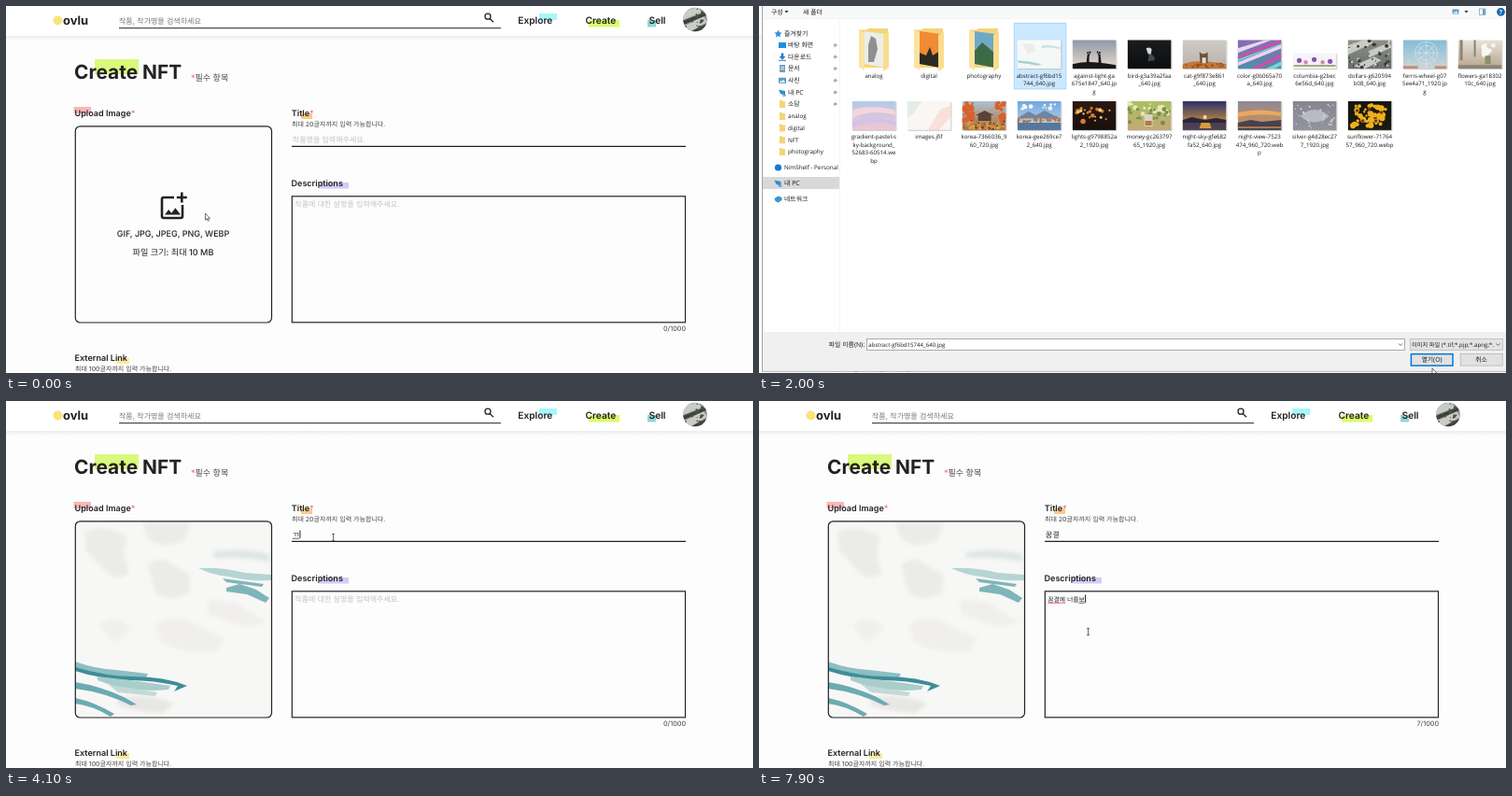
An HTML page that plays this animation: 800x393 px, repeating every 8 s.

```html
<!DOCTYPE html>
<html lang="ko">
<head>
<meta charset="utf-8">
<title>Create NFT</title>
<style>
html, body { margin: 0; width: 100%; height: 100%; overflow: hidden; background: #fdfdfe; }
svg { display: block; width: 100%; height: 100%; }
text { white-space: pre; text-rendering: geometricPrecision; }
#page { font-family: Inter, "Noto Sans CJK KR", "Noto Sans CJK", sans-serif; fill: #222; }
#dialog { font-family: "Open Sans", "Noto Sans CJK KR", "Noto Sans CJK", sans-serif; font-size: 6.9px; fill: #1a1a1a; }
.nav { font-size: 10.2px; font-weight: 600; }
.head { font-size: 9.05px; font-weight: 600; }
.hint { font-size: 7px; fill: #444; }
.field { font-size: 8px; }
.ghost { font-size: 8px; fill: #c2c2c4; }
.req { fill: #f2667a; font-weight: 400; }
.line { fill: none; stroke: #222; }
</style>
</head>
<body>
<svg viewBox="0 0 800 393" xmlns="http://www.w3.org/2000/svg">
<defs>
  <linearGradient id="shade" x2="0" y2="1">
    <stop stop-color="#000" stop-opacity=".07"/><stop offset="1" stop-color="#000" stop-opacity="0"/>
  </linearGradient>
  <clipPath id="card"><rect x="74.3" y="128.8" width="210.2" height="210.2" rx="5"/></clipPath>
  <clipPath id="disc"><circle cx="738" cy="14.5" r="12.8"/></clipPath>
  <clipPath id="combo"><rect x="698" y="357" width="90" height="12"/></clipPath>
  <filter id="soft"><feGaussianBlur stdDeviation="2.2"/></filter>
</defs>

<g id="page">
  <rect width="800" height="393" fill="#fdfdfe"/>
  <rect width="800" height="32" fill="#fff"/>
  <rect y="32" width="800" height="5" fill="url(#shade)"/>

  <circle cx="55.5" cy="15.5" r="5" fill="#fae27c"/>
  <text x="61" y="20" font-size="13" font-weight="700">ovlu</text>
  <text class="field" x="121" y="18.8" fill="#777">작품, 작가명을 검색하세요</text>
  <path class="line" d="M121 23.700H530"/>
  <path class="line" stroke-width="1.300" d="M519 11.200a3 3 0 1 0-6 0a3 3 0 1 0 6 0M518.200 13.400l3.800 3.800"/>
  <path fill="#a5f7fa" d="M571 8h19v7h-19z"/>
  <path fill="#dcfb6c" d="M624 15h33v7.500h-33z"/>
  <path fill="#93d8d2" d="M687 15h9v7.500h-9z"/>
  <g class="nav">
    <text x="548.300" y="19">Explore</text>
    <text x="620.500" y="19">Create</text>
    <text x="688.500" y="19">Sell</text>
  </g>
  <g clip-path="url(#disc)" id="face">
    <rect x="724" y="1" width="28" height="28" fill="#8d918b"/>
    <path fill="#c9ccc4" d="M724 6l17-5 4 6-20 8zM727 21l20-10 4 6-19 11z"/>
    <path fill="#3d423d" d="M724 16l24-9 2 3-24 10zM732 28l18-9v6l-8 4z"/>
  </g>

  <path fill="#d9f97c" d="M95 57h47v16h-47z"/>
  <text x="73" y="77.600" font-size="20.900" font-weight="700">Create NFT</text>
  <text x="198" y="80.400" font-size="9" fill="#444"><tspan class="req">*</tspan>필수 항목</text>

  <path fill="#f8b7b8" d="M72.500 108h18.500v7h-18.500z"/>
  <path fill="#fbc98a" d="M316 115h12v6h-12z"/>
  <path fill="#d3cbf5" d="M336 189h31v6.500h-31z"/>
  <path fill="#fbeaa0" d="M118 377h14v6h-14z"/>
  <g class="head">
    <text x="73.500" y="118.200">Upload Image<tspan class="req">*</tspan></text>
    <text x="305.800" y="118.200">Title<tspan class="req">*</tspan></text>
    <text x="305.500" y="192.800">Descriptions</text>
    <text x="73.500" y="380.200">External Link</text>
  </g>
  <text class="hint" x="306" y="129.200">최대 20글자까지 입력 가능합니다.</text>
  <text class="hint" x="74" y="391.200">최대 100글자까지 입력 가능합니다.</text>

  <g id="empty">
    <path class="line" stroke-width="2.600" d="M180 205H169q-2 0-2 2V225q0 2 2 2H187q2 0 2-2V213M188.300 199.500V210.500M182.800 205H193.800"/>
    <path d="M170 223.500l4.200-5.400 3 3.600 4.200-5.400 5.600 7.200z"/>
    <g text-anchor="middle" font-weight="500">
      <text x="179" y="247.200" font-size="9">GIF, JPG, JPEG, PNG, WEBP</text>
      <text x="179" y="267" font-size="9.150">파일 크기: 최대 10 MB</text>
    </g>
  </g>
  <g id="art" clip-path="url(#card)">
    <rect x="74" y="128" width="211" height="212" fill="#f7f7f6"/>
    <g filter="url(#soft)">
      <path fill="#ebebe8" d="M84 140q24-10 46 6l-4 18 6 20q-14 10-24 0l-22-24zM146 130h52l-6 18q-22 12-40 0zM152 176q14-14 30 2l16 8-2 20q-20 10-36 0z"/>
      <path fill="#f0efec" d="M160 240q20-14 44 0l30 14-8 14q-34 4-60-10zM216 212l30 4 34 22-24 4-40-14zM100 240q18-14 34 4l-18 16z"/>
      <path fill="#dde6e4" d="M222 162q30-6 60 2v8q-32-6-60-4z"/>
      <path fill="#e8e6e2" d="M120 318q30-6 60 6l-12 10q-30-2-48-8z"/>
    </g>
    <path fill="#b5d5d3" d="M206 179q26-1 50 5l28 2v6q-26 1-46-4-18-2-32-9z"/>
    <path fill="#7eb5b8" d="M236 200l14-4 18 6 14 9-4 5-20-9-22-3zM232 190l44 6-2 3-38-5z"/>
    <path fill="#8bbfc2" d="M74 279q22 8 44 9l34 4-2 4-36-1q-22-2-40-8z"/>
    <path fill="#3f8d98" d="M74 285q34 10 62 10 34 0 58 10l-14 6 4-6q-26-6-52-6-34-2-58-10z"/>
    <path fill="#a9cdca" d="M98 295q38 4 78 10l-2 4q-44 4-76-10z"/>
    <path fill="#6aabb1" d="M74 301q26 4 52 16l14 8-6 1q-28-14-60-18zM74 318q20 4 42 17l-4 3q-20-12-38-14z"/>
    <path fill="#c1dad7" d="M110 304l52 8-2 4-40-4z"/>
  </g>
  <rect class="line" x="74.300" y="128.800" width="210.200" height="210.200" rx="5" stroke-width="1.200"/>

  <path class="line" stroke-width="1.200" d="M306 150.300H728"/>
  <rect class="line" x="306.300" y="203.800" width="421.200" height="135" stroke-width="1.200"/>
  <text id="count" x="728" y="348.300" font-size="7.300" text-anchor="end" style="fill:#444"></text>
</g>

<g id="dialog"></g>
<g id="arrow"><path d="M0 0V7.200L1.700 5.700 2.800 8.200 3.900 7.700 2.800 5.300H5Z" fill="#fff" stroke="#333" stroke-width=".7"/></g>
<g id="beam"><path d="M-1.500-3.600H1.500M-1.500 3.600H1.500M0-3.600V3.600" fill="none" stroke="#444" stroke-width=".8"/></g>
</svg>

<script>
const $ = id => document.getElementById(id);

function el(tag, attrs, parent, text) {
  const node = document.createElementNS("http://www.w3.org/2000/svg", tag);
  for (const k in attrs) node.setAttribute(k, attrs[k]);
  if (text !== undefined) node.textContent = text;
  return parent.appendChild(node);
}
const box = (p, x, y, width, height, fill, more) => el("rect", { x, y, width, height, fill, ...more }, p);
const path = (p, d, fill, more) => el("path", { d, fill, ...more }, p);
const word = (p, x, y, text, more) => el("text", { x, y, ...more }, p, text);
const show = (node, on) => node.style.display = on ? "" : "none";
const dot = (x, y, r) => `M${x - r} ${y}a${r} ${r} 0 1 0 ${2 * r} 0a${r} ${r} 0 1 0 ${-2 * r} 0`;
const dots = (r, ...xy) => xy.map(([x, y]) => dot(x, y, r)).join("");

let seed = 7;
const rand = () => (seed = seed * 16807 % 2147483647) / 2147483647;
// n random dots inside the given area
const specks = (n, r, x, y, w, h) =>
  Array.from({ length: n }, () => dot(x + w * rand(), y + h * rand(), r * (.5 + rand()))).join("");

// ---- file dialog ----
const dlg = $("dialog");
box(dlg, 3.5, -2, 800, 393.2, "#fff", { stroke: "#9a9a9a", "stroke-width": .9 });
box(dlg, 4, 0, 796, 13, "#f8f9fa");
path(dlg, "M4 13.500H800M86.500 14V349", "none", { stroke: "#f1f1f3", "stroke-width": .8 });
box(dlg, 4, 349, 796, 41.8, "#f0f0f0");
box(dlg, 4, 183, 82, 13, "#d9d9d9");
box(dlg, 115.5, 356.5, 576, 12, "#fff");
box(dlg, 697.5, 356.5, 99, 12, "#e3e3e3", { stroke: "#b4b4b4", "stroke-width": .7 });
word(dlg, 699, 365.2, "이미지 파일 (*.tif;*.pjp;*.apng;*.", { "font-size": 6.2, "clip-path": "url(#combo)" });
path(dlg, "M789.500 361.500l2 2 2-2", "none", { stroke: "#444", "stroke-width": .8 });
box(dlg, 771.5, 3, 6.5, 6.5, "#fff", { stroke: "#7f97aa", "stroke-width": .7 });
box(dlg, 775, 3.3, 2.7, 5.9, "#5b9fce");
path(dlg, dot(794.5, 6.3, 4.4), "#1668b3");
word(dlg, 794.5, 8.8, "?", { fill: "#fff", "font-weight": 700, "text-anchor": "middle" });

const BLUE = "#2b8fdb";
const icons = {
  star: ["M0-4l1.200 2.700 3 .3-2.300 2 .7 3L0 2.500-2.600 4l.7-3-2.300-2 3-.3z", BLUE],
  desk: ["M-4-3H4V3H-4z", "#1e90e0"],
  down: ["M-1.300-4H1.300V-.5H3.500L0 3-3.500-.5H-1.300zM-4 3.200H4v1H-4z", "#2579c4"],
  doc: ["M-3-4H3V4H-3zM-2-2V-1.300H2V-2zM-2 0V.7H2V0z", "#7d9db8"],
  pic: ["M-4-3H4V3H-4zM-3 2H3L1-1-.5 1-1.500 0z", "#5b9cc6"],
  pc: ["M-4-3L3-1.500V3L-2 1.500zM0 3h4v1h-4z", "#2f8fcf"],
  dir: ["M-3-4H-.5L.3-3H3V4H-3z", "#f6d374"],
  net: ["M-4-1L0-3.500 4-2V1L0 3.500-3 2z", "#3a94cf"],
  ball: [dot(0, 0, 3.6), "#1478d0"]
};
const tree = [
  ["star", 29.5, "즐겨찾기", 0], ["desk", 42, "바탕 화면", 2], ["down", 54.5, "다운로드", 2],
  ["doc", 67, "문서", 2], ["pic", 79.7, "사진", 2], ["pc", 92.5, "내 PC", 2], ["dir", 105, "소담", 2],
  ["dir", 118, "analog", 1], ["dir", 130.6, "digital", 1], ["dir", 143.2, "NFT", 1], ["dir", 156, "photography", 1],
  ["ball", 173, "NimShelf - Personal", 0], ["pc", 189.5, "내 PC", 0], ["net", 207, "네트워크", 0]
];
const late = el("g", {}, dlg);
for (const [icon, y, name, kind] of tree) {
  const [d, fill] = icons[icon];
  path(icon === "ball" ? late : dlg, d, fill, { transform: `translate(${kind ? 25 : 20.5} ${y})`, "fill-rule": "evenodd" });
  word(dlg, kind ? 31 : 27, y + 2.4, name, { "font-size": /[가-힣]/.test(name) ? 6.9 : 6.3 });
  if (kind === 2) path(dlg, `M81.500 ${y - 2}l2.500 2.300-2 .5-.5 1-1.800-1.800 1-.5zM79.500 ${y + 2.3}l1.600-1.600`, "#a3a6aa", { stroke: "#a3a6aa", "stroke-width": .4 });
}

const tile = box(dlg, 273.2, 18.3, 55.6, 70.6, "none", { "stroke-width": .8 });

// Pictures: caption, sky, ground, then [fill, path] shapes in a 47 x 31 box; "~" marks a stroke.
const BLACK = "#17181c";
const pics = [
  ["abstract-gf6bd15|744_640.jpg", "#f8f9f8", "#f3f6f4", ["#cfe3df", "M26 6q10-2 20 2v2q-12-3-20-1z"], ["#a5d0cc", "M1 22q13 1 25 4l-4 1.500q-10-2-21-3z"], ["#ecedea", "M5 4h12l3 8-9 3z"]],
  ["against-light-ga|675e1847_640.jp|g", "#8f97a9", "#eadcc9", [BLACK, "M0 31v-5q12-3 24-2t23 3v4zM15 25l1-9 3-4 1 .5-2 5v8zM28 25v-8l-2-4.500 1-.5 3 4 1 9z" + dots(1.4, [17, 14], [29, 14])]],
  ["bird-g3a39a2faa|_640.jpg", "#1b1c1f", "#0c0d0f", ["#d9d9d8", "M20 9q4-2 6 1l-1 6-3-1z"], ["#44474b", "M23 15q7 1 6 7l-7 1z"]],
  ["cat-g9f873e861|_640.jpg", "#cfccc7", "#b9b1a6", ["#c07a3c", "M0 31v-5q12-4 24-3t23 3v5z"], ["#96501f", specks(30, .9, 1, 25, 45, 5)], ["#6b5238", "M19 25l-1-12 3 2h3l3-2v12z"], ["#e7ddd0", "M21 19h4v6h-4z"]],
  ["color-g0b065a70|a_640.jpg", "#8b6bb4", "#4c8fac", ["#e9d6ee", "M0 9L30 0h7L0 14zM0 24L47 5v4L0 28z"], ["#cf4fa6", "M0 17L47 0v3L0 20zM14 31L47 15v4L22 31z"], ["#7ad6d6", "M0 21L47 4v1L0 23zM30 31l17-8v4l-8 4z"]],
  ["columbia-g2bec|6e56d_640.jpg", "#fbfafc", "#f2eef4", ["#8a52b0", dots(2.6, [7, 22], [23, 21], [40, 23])], ["#d684b4", dots(2.2, [14, 24], [32, 24])], ["#7b9a5e", "M1 27h45v1.500H1z"]],
  ["dollars-g620594|b08_640.jpg", "#8c908b", "#6a6f6a", ["#c8cbc3", "M0 6L20-1l8 4-28 13zM22 12l22-9 3 5-22 10zM6 28l22-10 8 4-18 9z"], ["#363b37", specks(26, 1.4, 1, 1, 45, 29)], ["#d5d7cf", specks(18, 1, 1, 1, 45, 29)]],
  ["ferris-wheel-g07|5ee4a71_1920.jp|g", "#86bcd8", "#cbd7d8", ["~#e3ebee", dot(25, 14, 12) + dot(25, 14, 8) + "M25 2V31M13 14H37M16 6L34 22M34 6L16 22"], ["#c98b78", "M0 31v-3h16v3zM34 31v-3h13v3z"]],
  ["flowers-ga18302|10c_640.jpg", "#e8e2d9", "#b7a48c", ["#8d8376", "M2 0h3v22H2zM17 0h2v18h-2zM0 27h47v4H0z"], ["#faf7f2", specks(10, 2.4, 26, 5, 12, 12)], ["#87906c", "M29 17h6v9h-6z"]],
  ["gradient-pastel-s|ky-background_|52683-60514.we|bp", "#b4c9ec", "#f1c6d0", ["#f4d5dc", "M0 10q20-8 47 0v5Q22 8 0 18z"], ["#d3c2e6", "M0 22q22-8 47 0v4Q24 18 0 28z"]],
  ["images.jfif", "#fbf6f4", "#f9f6f3", ["#e2eee3", "M0 0h16L6 14 0 18z"], ["#f9e1db", "M22 31L36 8l11-3v12L34 31z"]],
  ["korea-7366036_9|60_720.jpg", "#a8c3d6", "#b86a2d", ["#d9622c", specks(34, 2, 0, 2, 12, 20) + specks(24, 2, 37, 1, 9, 20)], ["#5a4237", "M14 15l10-5 10 5zM17 15h14v6H17z"], ["#d9a04a", specks(40, 1.3, 1, 22, 45, 8)], ["#7a4526", specks(24, 1, 1, 18, 45, 12)]],
  ["korea-gee269ce7|2_640.jpg", "#6fa8e0", "#c9d9e6", ["#f2f5f8", specks(12, 1.8, 4, 3, 38, 5)], ["#6f84a3", "M0 18L12 11l8 4 9-5 18 9z"], ["#b5763f", specks(36, 1.2, 0, 17, 46, 5)], ["#55779c", "M0 23h47v8H0z"]],
  ["lights-g9798852a|2_1920.jpg", "#2b1a12", "#170f0c", ["#d97a2e", specks(12, 2, 4, 6, 40, 16)], ["#f8cc82", specks(9, 1.4, 6, 9, 36, 12)]],
  ["money-gc263797|65_1920.jpg", "#a9bf62", "#c4a877", ["#eee6b4", specks(22, 2, 2, 2, 42, 12)], ["#75904a", specks(20, 1.8, 1, 8, 45, 16)], ["#d9d3c0", "M18 14h9v13h-9z"], ["#b57840", "M19 21h7v5h-7z"]],
  ["night-sky-gfe682|fa52_640.jpg", "#2c3068", "#f3a838", ["#fbe08a", dot(24, 17, 2)], ["#2a2436", "M0 20l10-3 14 3 12-2 11 2v4H0z"], ["#4c3f52", "M0 23h47v8H0z"], ["#d9993f", "M20 23h9l2 6H18z"]],
  ["night-view-7523|474_960_720.web|p", "#8d8a97", "#d98f4c", ["#e9a860", "M0 12q22-5 47 0v4Q24 12 0 17z"], ["#46414f", "M0 23l14-3 12 2 21-2v11H0z"], ["#a9764f", "M0 27h47v2H0z"]],
  ["silver-g4d28ec27|7_1920.jpg", "#85868f", "#92939c", ["#b9bac1", "M8 16q15-14 31 0-16 13-31 0z"], ["#d5d7da", specks(34, .8, 2, 2, 43, 27)]],
  ["sunflower-71764|57_960_720.webp", "#15150f", "#1c1a10", ["#eeb01c", specks(44, 2.2, 5, 4, 36, 23)], ["#6a4312", dots(1.8, [10, 10], [23, 8], [36, 12], [16, 21], [30, 21])]]
];
path($("face"), specks(18, 1.2, 726, 3, 24, 23), "#4a4f4a");

const caption = (p, x, y, text) => text.split("|").forEach((s, i) =>
  word(p, x, y + 8.5 * i, s, { "text-anchor": "middle", "font-size": 6.15 }));

const folders = [
  ["analog", "#eceeea", "M-6 42l3-10 5 3 2 11-4 14h-6z", "#8f9091"],
  ["digital", "#f08a35", "M-10 62V50l7 3 4-9 3 9 8-5v18z", "#2b2a22"],
  ["photography", "#6fa9c6", "M-10 62V48l8-9 14 12v15z", "#3c6a45"]
];
folders.forEach(([name, sky, d, fill], i) => {
  const g = el("g", { transform: `translate(${123 + 59 * i} 0)` }, dlg);
  path(g, "M-16 25.500h8l2-1.500H15V66H-16z", "#f4d47a");
  path(g, "M-10 27L12 30V66L-10 62z", sky);
  path(g, d, fill);
  path(g, "M-16 25.500l6 3V69l-6-4z", "#fbe3a0");
  path(g, "M10 31l6-3V66l-6 4z", "#f9dd8d");
  caption(g, 0, 76.6, name);
});

const thumbs = pics.map(([name, top, low, ...art], i) => {
  const row = i < 9 ? 0 : 1, cx = 123 + 59 * (row ? i - 9 : i + 3), y = row ? 102 : 36.3;
  const g = el("g", {}, dlg), grad = el("linearGradient", { id: "sky" + i, x2: 0, y2: 1 }, g);
  el("stop", { "stop-color": top }, grad);
  el("stop", { offset: 1, "stop-color": low }, grad);
  const crop = name.startsWith("columbia") ? 14 : 0;
  const pic = el("svg", { x: cx - 23.4, y: y + crop, width: 47, height: 31 - crop, viewBox: `0 ${crop} 47 ${31 - crop}` }, g);
  box(pic, 0, 0, 47, 31, `url(#sky${i})`);
  for (const [fill, d] of art)
    fill[0] === "~" ? path(pic, d, "none", { stroke: fill.slice(1), "stroke-width": .6 }) : path(pic, d, fill);
  path(g, `M${cx - 22.5} ${y + 31.3}h46.400V${y + crop + 1}`, "none", { stroke: "#b4b4b4", "stroke-width": .7 });
  caption(g, cx, row ? 142.2 : 76.6, name);
  return g;
});

word(late, 13, 8.6, "구성", {});
path(late, "M27.500 5h4l-2 2.500zM755.500 5h4l-2 2.500z", "#333");
word(late, 47, 8.6, "새 폴더", {});
path(late, icons.pic[0], icons.pic[1], { transform: "translate(746 6) scale(.85)", "fill-rule": "evenodd" });
word(late, 113, 365.2, "파일 이름(N):", { "text-anchor": "end" });
box(late, 115.5, 356.5, 576, 12, "none", { stroke: "#999", "stroke-width": .8 });
path(late, "M685 361.500l2 2 2-2", "none", { stroke: "#444", "stroke-width": .8 });
const mark = box(late, 117, 358, 0, 9.5, "#0078d7");
const file = word(late, 117.3, 365, "abstract-gf6bd15744_640.jpg", { "font-size": 6.1 });
const openBtn = box(late, 698.4, 372.7, 44.6, 12.4, "#e1e1e1", { stroke: "#0078d7", "stroke-width": 1.5 });
box(late, 751.2, 372.5, 45, 12.6, "#e1e1e1", { stroke: "#adadad", "stroke-width": .7 });
word(late, 720.5, 381.4, "열기(O)", { "text-anchor": "middle" });
word(late, 773.5, 381.4, "취소", { "text-anchor": "middle" });

// ---- text fields ----
function field(x, y, size, hint) {
  const g = el("g", {}, $("page"));
  const ghost = word(g, x, y, hint, { class: "ghost" });
  const text = word(g, x, y, "", { "font-size": size });
  const under = box(g, x, y + 1.3, 0, .7, "#222");
  const wavy = box(g, x, y + 1.3, 0, .8, "#e5484d");
  const caret = box(g, x, y - 7, .9, 8.4, "#111");
  const width = n => n ? text.getSubStringLength(0, n) : 0;
  return (value, composing, focus, wrong) => {
    if (text.textContent !== value) text.textContent = value;
    show(ghost, !value);
    show(caret, focus);
    const n = value.length, end = width(n), from = composing && n ? width(n - 1) : end;
    under.setAttribute("x", x + from);
    under.setAttribute("width", end - from);
    wavy.setAttribute("width", wrong ? width(wrong) : 0);
    caret.setAttribute("x", x + end + (n ? .3 : -.4));
  };
}
const setTitle = field(306.8, 145.5, 8, "작품명을 입력해주세요.");
const setText = field(309.3, 214.5, 6.8, "작품에 대한 설명을 입력해주세요.");

// ---- timeline ----
const LOOP = 8000, STEP = 100;
const titleKeys = [[0, ""], [4000, "ㄲ"], [4500, "꾸"], [4700, "꿈"], [4800, "꿈ㄱ"], [4900, "꿈겨"], [5000, "꿈결"]];
const textKeys = [[0, ""], [6300, "ㄲ"], [6400, "꾸"], [6700, "꿈"], [6800, "꿈ㄱ"], [6900, "꿈겨"], [7000, "꿈결"],
  [7100, "꿈결ㅇ"], [7200, "꿈결에"], [7300, "꿈결에 "], [7400, "꿈결에 ㄴ"], [7500, "꿈결에 너"],
  [7600, "꿈결에 너ㄹ"], [7700, "꿈결에 너르"], [7900, "꿈결에 너를보"]];
const mouse = [[0, 213.5, 222], [1200, 213.5, 222], [1600, 302, 52], [1800, 302, 52], [2000, 721, 388], [2100, 721, 389],
  [2300, 717, 377], [2500, 716, 376], [2700, 684.5, 345], [2900, 712, 200], [3000, 716, 151], [3400, 350.5, 146],
  [5200, 350.5, 146], [5500, 335, 198], [5800, 352.5, 247], [LOOP, 352.5, 247]];
// time, opacity, scale
const panel = [[0, 0, .95], [300, 0, .95], [400, .35, .965], [600, 1, 1], [2600, 1, 1], [2700, .68, .9884], [2800, .25, .975], [2900, 0, .96], [LOOP, 0, .96]];

const held = (keys, t) => keys.filter(k => k[0] <= t).pop()[1];
function tween(keys, t) {
  const i = keys.findIndex(k => k[0] > t), a = keys[i - 1], b = keys[i];
  const p = (t - a[0]) / (b[0] - a[0]), e = p * p * (3 - 2 * p);
  return a.slice(1).map((v, j) => v + (b[j + 1] - v) * e);
}

function draw(t) {
  const [alpha, scale] = tween(panel, t);
  show(dlg, alpha > 0);
  dlg.setAttribute("opacity", alpha);
  dlg.setAttribute("transform", `translate(425 190) scale(${scale}) translate(-425 -190)`);
  thumbs.forEach((g, i) => show(g, t >= 600 + i * 20));
  show(late, t >= 1200);

  const [x, y] = tween(mouse, t);
  const picked = t >= 1700, sent = t >= 2500;
  const hover = t < 2600 && x > 273 && x < 329 && y > 18 && y < 89;
  tile.setAttribute("fill", sent ? "#d9d9d9" : picked ? "#cce8ff" : hover ? "#e5f3ff" : "none");
  tile.setAttribute("stroke", picked && !sent ? "#99d1ff" : "none");
  show(file, picked);
  file.setAttribute("fill", sent ? "#fff" : "#1a1a1a");
  mark.setAttribute("width", sent && alpha > 0 ? file.getComputedTextLength() + .6 : 0);
  openBtn.setAttribute("fill", t >= 2200 ? "#e5f1fb" : "#e1e1e1");
  openBtn.setAttribute("stroke-width", t >= 2200 ? .8 : 1.5);

  show($("empty"), t < 3000);
  show($("art"), t >= 3000);

  const title = held(titleKeys, t), text = held(textKeys, t);
  setTitle(title, t < 5100, t >= 3400 && t < 5700, 0);
  setText(text, !text.endsWith(" "), t >= 5800, t >= 7300 ? 3 : 0);
  $("count").textContent = text.length + "/1000";

  const beam = t >= 3000 && x > 306 && x < 728 && (y > 134 && y < 151 || y > 204 && y < 339);
  show($("beam"), beam);
  show($("arrow"), !beam);
  $(beam ? "beam" : "arrow").setAttribute("transform", `translate(${x} ${y})`);
}

const start = performance.now();
function tick() {
  const t = (performance.now() - start) % LOOP;
  draw(Math.floor(t / STEP) * STEP);
  requestAnimationFrame(tick);
}
tick();
</script>
</body>
</html>
```
